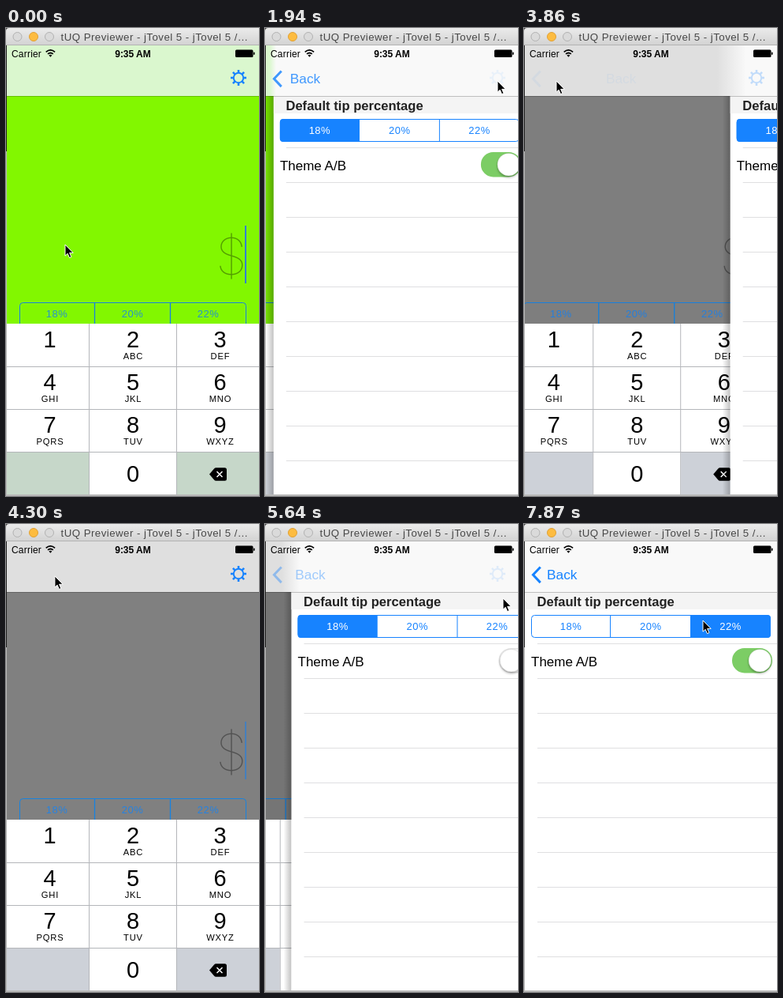
Animation of 321 by 592 pixels, one loop 8 s. Source, as an HTML page:

```html
<!DOCTYPE html>
<html lang="en">
<head>
<meta charset="utf-8">
<title>Tip calculator settings</title>
<style>
  html, body { margin: 0; width: 100%; height: 100%; overflow: hidden; background: #fff; }
  svg { display: block; width: 100%; height: 100%; }
  text { font-family: "Liberation Sans", Arial, sans-serif; }
  .mid { text-anchor: middle; }
  .pct { font-size: 13px; letter-spacing: .5px; text-anchor: middle; }
  .digit { font-size: 29px; text-anchor: middle; }
  .abc { font-size: 11.2px; letter-spacing: .8px; text-anchor: middle; }
</style>
</head>
<body>
<svg viewBox="0 0 321 592" preserveAspectRatio="none">
  <defs>
    <linearGradient id="chrome" x2="0" y2="1">
      <stop stop-color="#ebebeb"/><stop offset="1" stop-color="#d2d2d2"/>
    </linearGradient>
    <linearGradient id="shade">
      <stop stop-color="#000" stop-opacity="0"/><stop offset="1" stop-color="#000" stop-opacity=".24"/>
    </linearGradient>
    <linearGradient id="barFill" gradientUnits="userSpaceOnUse" y1="0" y2="0">
      <stop id="barRoot"/><stop offset="1" stop-color="#f9f9f9"/>
    </linearGradient>
    <filter id="soft" x="-30%" y="-30%" width="160%" height="170%">
      <feDropShadow dx="0" dy="2" stdDeviation="1.5" flood-opacity=".3"/>
    </filter>
    <clipPath id="screen"><rect x="1" y="22" width="320" height="568"/></clipPath>
    <clipPath id="segClip"><rect x="9" y="115" width="304" height="29" rx="4"/></clipPath>
  </defs>

  <rect width="321" height="592" fill="#b9b9b9"/>
  <path d="M.5 22V156" stroke="#222"/>

  <g clip-path="url(#screen)">
    <rect id="paper" x="1" y="22" width="320" height="568"/>
    <g id="root">
      <text x="305.500" y="312" text-anchor="end" font-size="64" font-weight="100"
        style="font-family:Inter,Lato,sans-serif" fill-opacity=".36">$</text>
      <path id="caret" d="M304 250V323" stroke="#2f7fd6" stroke-width="2"/>
      <rect x="17.500" y="347.500" width="287" height="40" rx="4" fill="none" stroke="#1783e0"/>
      <path d="M112.500 348v30M208.500 348v30" stroke="#1783e0" stroke-width="1.300"/>
      <g id="tips" fill="#1783f0" fill-opacity=".85"></g>
    </g>
    <rect id="dim" x="1" y="22" width="320" height="568"/>
    <g id="pad">
      <rect x="1" y="374" width="420" height="216" fill="#fff"/>
      <g id="sideKeys">
        <rect x="1" y="537" width="104" height="53"/>
        <rect x="217" y="537" width="104" height="53"/>
      </g>
      <path d="M1 428.500H321M1 482.500H321M1 536.500H321M105.500 374V590M216.500 374V590" stroke="#b4b6ba"/>
      <path d="M258 564.500l6-7q1-1.200 2.500-1.200H277.500q2.500 0 2.500 2.500v11.400q0 2.500-2.500 2.500H266.500q-1.500 0-2.500-1.200z"/>
      <path d="M267.500 561l7 7m0-7l-7 7" stroke="#fff" stroke-width="1.500"/>
      <g id="keys"></g>
    </g>

    <g id="settings">
      <rect x="-9" y="22" width="10" height="568" fill="url(#shade)"/>
      <rect x="1" y="22" width="320" height="568" fill="#fff"/>
      <rect x="1" y="86" width="320" height="22" fill="#f4f4f4"/>
      <text x="16.500" y="103.500" font-size="16.600" font-weight="700" fill="#222">Default tip percentage</text>
      <g clip-path="url(#segClip)">
        <rect id="pressed" x="211" y="115" width="102" height="29" fill="#d5e8ff"/>
        <rect id="chosen" y="115" width="102" height="29" fill="#1783ff"/>
      </g>
      <rect x="9.500" y="115.500" width="303" height="28" rx="4" fill="none" stroke="#1783ff"/>
      <path d="M109.500 115V144M211.500 115V144" stroke="#1783ff"/>
      <g id="choices"></g>
      <path id="rules" stroke="#dfdfe1"/>
      <text x="9" y="179.500" font-size="17">Theme A/B</text>
      <rect id="track" x="264.700" y="157.700" width="49.600" height="30" rx="15" stroke-width="1.400"/>
      <circle id="knob" cy="172.700" r="14.300" fill="#fff" stroke="#00000018" filter="url(#soft)"/>
    </g>

    <rect x="1" y="22" width="320" height="64" fill="url(#barFill)"/>
    <path d="M1 86.500H321" stroke="#000" stroke-opacity=".22"/>
    <g id="back">
      <path d="M20.800 54.500L11.500 64.300l9.300 9.800" fill="none" stroke="#1783ff" stroke-width="3"/>
      <text id="backText" x="29" y="70" font-size="17.300" fill="#1783ff">Back</text>
    </g>
    <g id="gear" transform="translate(295 63)" fill="none" stroke="#1783ff">
      <circle r="6.200" stroke-width="2"/>
      <g id="teeth" stroke-width="2.600"></g>
    </g>

    <text x="7" y="36.500" font-size="12" letter-spacing=".2">Carrier</text>
    <text x="161" y="36.500" class="mid" font-size="12" font-weight="700">9:35 AM</text>
    <g fill="none" stroke="#000" stroke-width="1.700">
      <path d="M50.700 30.300q5.700-4.800 11.400 0M53 32.900q3.400-2.800 6.800 0"/>
      <path d="M56.400 36.800l-2-2.300q2-1.500 4 0z" fill="#000" stroke="none"/>
    </g>
    <rect x="291" y="27.500" width="22.500" height="9.500" rx="1.500"/>
    <rect x="314" y="30.500" width="1.500" height="3.500" rx=".7"/>
  </g>

  <rect width="321" height="22" fill="url(#chrome)"/>
  <path d="M0 21.500H321" stroke="#b3b3b3"/>
  <path d="M0 0h4Q0 0 0 4z" fill="#444"/>
  <g fill="#dadada" stroke="#b2b2b2">
    <circle cx="14.500" cy="11" r="5.500"/>
    <circle cx="35" cy="11" r="5.500" fill="#fdbc40" stroke="#e0a136"/>
    <circle cx="55" cy="11" r="5.500"/>
  </g>
  <text x="69.500" y="16" font-size="13.300" letter-spacing=".45" fill="#484848">tUQ Previewer - jTovel 5 - jTovel 5 /…</text>

  <path id="mouse" d="M0 0V14.200L3.200 11.300 5.500 16.600 7.900 15.600 5.600 10.400H10.200Z" stroke="#fff" stroke-linejoin="round"/>
</svg>
<script>
const LOOP = 8000, TICK = 148.5;
const PUSH = [1635, 5428], POP = 3689;
const TOGGLE_OFF = 2640, TOGGLE_ON = 6480;
const PRESS_22 = 7400, PICK_22 = 7560;

// time, x, y of the pointer tip
const PATH = [
  [0, 75, 274], [150, 82, 268], [1050, 294, 95], [1200, 295, 67],
  [2080, 295, 67], [2530, 289, 172], [2830, 289, 172], [3420, 41, 67],
  [4150, 41, 67], [5050, 302, 53], [5430, 302, 53], [5643, 302, 94],
  [6090, 290, 172], [6600, 290, 172], [6980, 257, 129], [7700, 257, 129], [7860, 227, 122]
];

const $ = id => document.getElementById(id);
const clamp = v => Math.max(0, Math.min(1, v));
const smooth = v => (v = clamp(v), v * v * (3 - 2 * v));
const within = (t, a, b) => t >= a && t < b;

function add(parent, name, attrs, text = '') {
  const el = document.createElementNS('http://www.w3.org/2000/svg', name);
  for (const key in attrs) el.setAttribute(key, attrs[key]);
  el.textContent = text;
  $(parent).append(el);
  return el;
}
function set(id, attrs) {
  for (const key in attrs) $(id).setAttribute(key, attrs[key]);
}
const shift = (id, x, y = 0) => set(id, { transform: `translate(${x} ${y})` });

const PERCENTS = ['18%', '20%', '22%'];
PERCENTS.forEach((p, i) => add('tips', 'text', { class: 'pct', x: 64.5 + 96 * i, y: 366 }, p));
const choices = PERCENTS.map((p, i) =>
  add('choices', 'text', { class: 'pct', x: 59.5 + 101.3 * i, y: 134 }, p));

const COLS = [55.5, 161, 271.5];
['', 'ABC', 'DEF', 'GHI', 'JKL', 'MNO', 'PQRS', 'TUV', 'WXYZ'].forEach((abc, i) => {
  const x = COLS[i % 3], y = 404 + 54 * Math.floor(i / 3);
  add('keys', 'text', { class: 'digit', x, y }, i + 1);
  add('keys', 'text', { class: 'abc', x: x + .5, y: y + 15 }, abc);
});
add('keys', 'text', { class: 'digit', x: COLS[1], y: 574 }, 0);

for (let a = 0; a < 360; a += 45) add('teeth', 'path', { d: 'M0-6.500V-10', transform: `rotate(${a})` });

let rules = '';
for (let y = 151.5; y < 590; y += 44) rules += `M17 ${y}H321`;
set('rules', { d: rules });

// remaining share of a critically damped slide
function rest(ms) {
  if (ms <= 0) return 1;
  const w = ms * .018, r = (1 + w) * Math.exp(-w);
  return r < .002 ? 0 : r;
}

// 1 = calculator in front, 0 = settings in front
function slide(t) {
  if (t < POP) return rest(t - PUSH[0]);
  return t < PUSH[1] ? 1 - rest(t - POP) : rest(t - PUSH[1]);
}

function pointer(t) {
  let i = PATH.findIndex(p => p[0] > t);
  if (i < 0) return PATH[PATH.length - 1].slice(1);
  const [t0, x0, y0] = PATH[i - 1], [t1, x1, y1] = PATH[i];
  const k = smooth((t - t0) / (t1 - t0));
  return [x0 + (x1 - x0) * k, y0 + (y1 - y0) * k];
}

function draw(t) {
  const s = slide(t), x = 320 * s, drift = -96 * (1 - s);
  const grey = within(t, TOGGLE_OFF, TOGGLE_ON);

  set('paper', { fill: grey ? '#808080' : '#82f700' });
  set('sideKeys', { fill: grey || s < .9 ? '#cdd1d8' : '#c6d7c9' });
  set('dim', { 'fill-opacity': .1 * (1 - s) });
  shift('root', drift);
  shift('pad', drift);
  shift('settings', x);
  $('settings').style.display = s === 1 ? 'none' : '';

  const phase = t % 1000;
  set('caret', { opacity: phase > 850 ? (phase - 850) / 150 : clamp((450 - phase) / 200) });

  const blur = 120 * s * (1 - s) + .5;
  set('barRoot', { 'stop-color': grey ? '#dfdfdf' : '#daf7ce' });
  set('barFill', { x1: x * 1.01 - blur, x2: x * 1.01 + blur });

  const backHeld = within(t, 3500, POP);
  set('back', { opacity: backHeld ? .2 : Math.max(1 - 6 * s, .3 * (1 - s)) });
  set('backText', { x: 29 + 92 * s });

  const gearHeld = within(t, 1480, PUSH[0]) || within(t, 5300, PUSH[1]);
  const popping = within(t, POP, PUSH[1]);
  const pushing = s < 1 && !popping;
  set('gear', { opacity: gearHeld ? .28 : pushing ? .35 * Math.sqrt(s) : s ** 7 });

  const on = t < TOGGLE_ON ? 1 - smooth((t - TOGGLE_OFF) / 220) : smooth((t - TOGGLE_ON) / 220);
  const lit = on > .5;
  set('track', { fill: lit ? '#7ccd65' : '#fff', stroke: lit ? '#7ccd65' : '#e2e2e2' });
  set('knob', { cx: 280 + 19.3 * on });

  const pick = t >= PICK_22 ? 2 : 0;
  set('chosen', { x: pick ? 211 : 8 });
  set('pressed', { opacity: +within(t, PRESS_22, PICK_22) });
  choices.forEach((el, i) => el.setAttribute('fill', i === pick ? '#fff' : '#1783ff'));

  shift('mouse', ...pointer(t));
}

const start = performance.now();
function loop(now) {
  const t = Math.max(0, now - start) % LOOP;
  draw(Math.min(53, Math.floor((t + 12) / TICK)) * TICK);
  requestAnimationFrame(loop);
}
draw(0);
requestAnimationFrame(loop);
</script>
</body>
</html>
```
